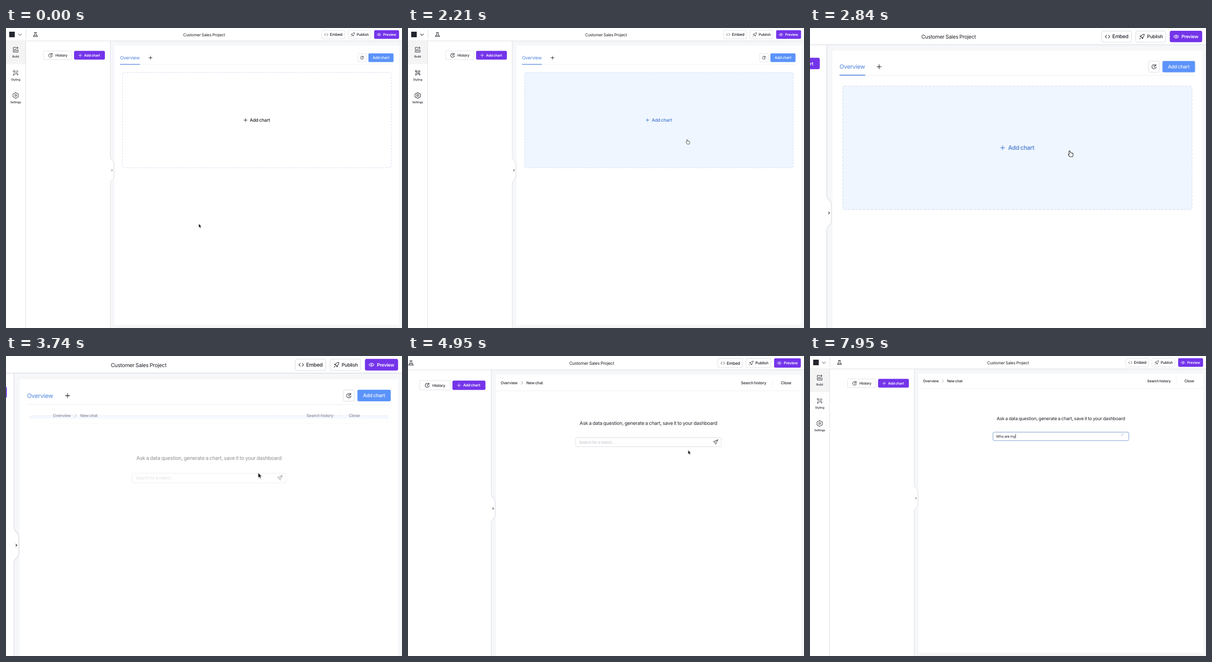
An HTML page that plays this animation: 861 by 650 pixels, repeating every 8 s.

```html
<!DOCTYPE html>
<html lang="en">
<head>
<meta charset="utf-8">
<title>Dashboard builder</title>
<style>
html, body { margin: 0; width: 100%; height: 100%; overflow: hidden; background: #fff; }
svg { display: block; width: 861px; height: 650px; }
text { font-family: Inter, "Open Sans", sans-serif; letter-spacing: -.02em; word-spacing: -.06em; fill: #20222a; white-space: pre; text-rendering: geometricPrecision; }
.mid { text-anchor: middle; }
.med { font-weight: 500; }
.semi { font-weight: 600; }
.white { fill: #fff; }
.icon { fill: none; stroke: #25272e; stroke-width: 1; stroke-linecap: round; stroke-linejoin: round; }
.thin { stroke-width: .8; }
.rule { fill: none; stroke: #d9dce2; }
.soft { fill: none; stroke: #f1f2f4; }
.btn { fill: #fff; stroke: #dfe1e6; }
.purple { fill: #7434ea; }

.cam, .tabs, .panel, .box, .hover, .tint, .underline, .pointer, .arrow, .hand, .beam, .focus, .caret {
  animation: 8s linear infinite;
}
.cam { transform-origin: 861px 0; animation-name: zoom; animation-timing-function: ease-in-out; }
.tabs { animation-name: leave; }
.panel { transform-origin: 545.5px 339px; animation-name: open; animation-timing-function: ease-in-out; }
.box { animation-name: collapse; }
.hover { animation-name: hover; }
.tint { fill: #20222a; stroke: #20222a; animation-name: tint; }
.tint text { fill: inherit; stroke: none; }
.underline { animation-name: underline; animation-timing-function: step-end; }
.pointer { animation-name: travel; }
.arrow { animation-name: arrow; animation-timing-function: step-end; }
.hand { animation-name: hand; animation-timing-function: step-end; }
.beam { animation-name: beam; animation-timing-function: step-end; }
.focus { animation-name: focus; }
.caret { animation-name: blink; }
.spinner { transform-origin: 681.5px 173.5px; animation: spin 1s linear -.05s infinite; }

@keyframes zoom {
  0%, 27.625% { transform: scale(1); }
  37.625%, 55.125% { transform: scale(1.33); }
  65.125%, 100% { transform: scale(1); }
}
@keyframes leave { 0%, 47% { opacity: 1; } 49.5%, 100% { opacity: 0; } }
@keyframes open {
  0%, 43.375% { opacity: 0; transform: scale(.69); }
  50%, 100% { opacity: 1; transform: scale(1); }
}
@keyframes collapse {
  0%, 43.375% { clip-path: inset(0 0 0 0); opacity: 1; }
  46.75% { clip-path: inset(0 0 97% 0); opacity: .65; }
  47.5%, 100% { clip-path: inset(0 0 100% 0); opacity: .5; }
}
@keyframes hover { 0%, 19.4% { opacity: 0; } 21.2%, 100% { opacity: 1; } }
@keyframes tint {
  0%, 19.4% { fill: #20222a; stroke: #20222a; }
  21.2%, 100% { fill: #4478cf; stroke: #4478cf; }
}
@keyframes underline { 0% { opacity: 1; } 43.4%, 100% { opacity: 0; } }
@keyframes travel {
  0% { transform: translate(419px, 424px); }
  10.5%, 12.5% { transform: translate(455px, 385px); }
  22.4% { transform: translate(578px, 268px); }
  27.6% { transform: translate(606px, 242px); }
  32.9% { transform: translate(636.5px, 214.5px); }
  39.5% { transform: translate(625.8px, 190px); }
  63% { transform: translate(625.8px, 190px); animation-timing-function: ease-in-out; }
  70.4%, 100% { transform: translate(523.7px, 178px); }
}
@keyframes arrow { 0% { opacity: 1; } 19.4% { opacity: 0; } 43.4% { opacity: 1; } 67%, 100% { opacity: 0; } }
@keyframes hand { 0% { opacity: 0; } 19.4% { opacity: 1; } 43.4%, 100% { opacity: 0; } }
@keyframes beam { 0% { opacity: 0; } 67% { opacity: 1; } 87.2%, 100% { opacity: 0; } }
@keyframes focus { 0%, 73.7% { opacity: 0; } 74.4%, 100% { opacity: 1; } }
@keyframes blink {
  0%, 74% { opacity: 0; }
  74.2%, 80.2% { opacity: 1; }
  81.5%, 86.8% { opacity: 0; }
  87.1%, 100% { opacity: 1; }
}
@keyframes spin { to { transform: rotate(360deg); } }
</style>
</head>
<body>
<svg viewBox="0 0 861 650">
  <defs>
    <path id="plus" d="M-3.5 0H3.5M0-3.5V3.5"/>
    <path id="clock" d="M3.2-2.7A4.2 4.2 0 1 0 4.2.5M3.7-4.3V-2H1.4M0-2V.4L1.7 1.4"/>
  </defs>
  <g class="cam">
    <rect width="861" height="650" fill="#fff"/>
    <rect x="227" y="28" width="634" height="622" fill="#f6f7f9"/>
    <rect x="236" y="38" width="619" height="605" rx="2" fill="#fff"/>

    <!-- top bar -->
    <path class="rule" d="M0 28H861M43.5 4V24"/>
    <rect x="7" y="8" width="12" height="12" fill="#25272e"/>
    <path class="icon" d="M26.8 12.8L30.2 16.2L33.6 12.8" stroke-width="1.2"/>
    <path class="icon" d="M61.7 9.5H66.3M62.6 9.5V13L59.3 18.6H68.7L65.4 13V9.5M61 16H67" stroke-width="1.2"/>
    <text class="mid" x="430.5" y="17.7" font-size="8.7">Customer Sales Project</text>
    <rect class="btn" x="686.5" y="5" width="50" height="18.6" rx="3"/>
    <path class="icon thin" d="M694.8 12L692.5 14.4L694.8 16.8M697.8 12L700.1 14.4L697.8 16.8"/>
    <text class="med" x="704.3" y="17.3" font-size="8.4">Embed</text>
    <rect class="btn" x="743.5" y="5" width="50" height="18.6" rx="3"/>
    <path class="icon thin" d="M757.7 10.4C754.8 10.4 753 12.2 751.8 14.4L754 16.5C756.2 15.4 757.8 13.4 757.7 10.4ZM752.8 12.9L750.4 13.4L751.8 14.4M755.5 15.7L755 18L754 16.5M750 18.3L751.8 16.5"/>
    <text class="med" x="762.4" y="17.2" font-size="7.85">Publish</text>
    <rect class="purple" x="800.4" y="4.7" width="54.2" height="18.9" rx="3"/>
    <g class="icon thin" style="stroke:#fff">
      <path d="M807 14.3C809.2 10.8 813.2 10.8 815.2 14.3C813.2 17.8 809.2 17.8 807 14.3Z"/>
      <circle cx="811.1" cy="14.3" r="1.2"/>
    </g>
    <text class="semi white" x="820" y="17.1" font-size="7.6">Preview</text>

    <!-- navigation -->
    <rect y="28.5" width="42.5" height="49.5" fill="#f4f4f5"/>
    <path class="rule" d="M42.8 28V650"/>
    <path class="icon" d="M21.5 42H16V52.2H26.2V47M18.6 49.7V46.5M21 49.7V45M23.5 49.7V47.5M24.6 41V45M22.6 43H26.6" stroke-width="1.3"/>
    <text class="mid med" x="21" y="63.9" font-size="6.25">Build</text>
    <path class="icon" d="M16 102L17 99.2L24 92.2L26 94.2L19 101.2ZM17.2 95.5L19.5 93.2L16.8 91.8L15.8 93ZM22.5 99.2L25.6 102.2L26.2 99.8L24 97.7" stroke-width="1.1"/>
    <text class="mid med" x="21" y="113.7" font-size="6.25">Styling</text>
    <path class="icon" d="M19.7 140H22.3L22.9 141.7L24.8 142.6L26.3 142.2L27.3 144.4L26.1 146L27.3 147.8L26.1 150L24.5 149.7L22.9 150.6L22.3 152.3H19.7L19.1 150.6L17.5 149.7L15.8 150L14.7 147.8L15.9 146L14.7 144.4L15.8 142.2L17.5 142.6L19.1 141.7Z"/>
    <circle class="icon" cx="21" cy="146.1" r="2"/>
    <text class="mid med" x="21" y="163.4" font-size="6.3">Settings</text>

    <!-- sidebar -->
    <rect class="btn" x="81.5" y="49.7" width="62" height="18.9" rx="3"/>
    <use class="icon" href="#clock" x="97" y="59.2"/>
    <text class="med" x="107.4" y="62.1" font-size="7.9">History</text>
    <rect class="purple" x="148" y="49.6" width="67" height="19" rx="3"/>
    <use class="icon thin" href="#plus" x="161.3" y="59.2" style="stroke:#fff"/>
    <text class="semi white" x="169.8" y="62" font-size="7.65">Add chart</text>
    <path class="rule" d="M226.7 28V280C227 286 234.5 287 234.5 295V321C234.5 329 227 330 226.7 336V650" style="fill:#fff"/>
    <path class="icon" d="M229.7 306.5L231.4 308.2L229.7 309.9"/>

    <!-- dashboard tab -->
    <g class="tabs">
      <path class="soft" d="M248 79H843"/>
      <text x="248" y="68.1" font-size="9.9" style="fill:#4a80dc">Overview</text>
      <path class="underline" d="M248 78.6H291" stroke="#4a80dc" stroke-width="1.3"/>
      <use class="icon" href="#plus" x="314.2" y="64.5"/>
      <rect class="btn" x="764.8" y="55.3" width="18.4" height="18.4" rx="3"/>
      <use class="icon" href="#clock" transform="translate(774 64.5) scale(.85)"/>
      <rect x="788" y="55" width="54.6" height="18.8" rx="2.5" fill="#5b93fa"/>
      <text class="med white" x="797.2" y="67.4" font-size="8.1">Add chart</text>
    </g>
    <g class="box">
      <rect class="hover" x="253.3" y="96.6" width="584.4" height="206" rx="3" fill="#eff6ff"/>
      <rect x="253.3" y="96.6" width="584.4" height="206" rx="3" fill="none" stroke="#d9dff0" stroke-width="1.2" stroke-dasharray="4 2.4"/>
      <g class="tint">
        <use href="#plus" x="520.8" y="199.6" stroke-linecap="round"/>
        <text class="med" x="530" y="203.1" font-size="9.85">Add chart</text>
      </g>
    </g>

    <!-- chat panel -->
    <g class="panel">
      <path class="soft" d="M236 70.5H855M797.3 47V61"/>
      <text class="med" x="245.8" y="57" font-size="7.8">Overview</text>
      <path class="icon" d="M287.6 51.3L290.6 54.3L287.6 57.3" style="stroke:#a5a9b2"/>
      <text class="med" x="298" y="57" font-size="7.8">New chat</text>
      <text class="med" x="733" y="57" font-size="7.8">Search history</text>
      <text class="med" x="814" y="57" font-size="8.05">Close</text>
      <text class="mid" x="545.5" y="139.2" font-size="9.88">Ask a data question, generate a chart, save it to your dashboard</text>
      <rect x="397.8" y="165" width="295.4" height="18.4" rx="3" fill="#fff" stroke="#dfe1e6"/>
      <rect class="focus" x="397.8" y="165" width="295.4" height="18.4" rx="3" fill="none" stroke="#7fa0cf"/>
      <g id="idle">
        <text x="404.7" y="176.9" font-size="7.93" style="fill:#bdc0c8">Search for a metric...</text>
        <path class="icon thin" d="M686.2 169.2L677 173L680.2 174.8L681.8 178.2ZM686.2 169.2L680.2 174.8"/>
      </g>
      <g id="busy">
        <text id="typed" x="404.5" y="176.8" font-size="7.85"></text>
        <path class="spinner" d="M677 173.5A4.5 4.5 0 0 1 681.5 169" fill="none" stroke="#7f9fd6"/>
      </g>
      <path id="caret" class="caret" d="M405 168.8V178.4" stroke="#20222a" stroke-width=".9"/>
    </g>

    <g class="pointer">
      <path class="arrow" d="M0 0V8.6L2 6.9L3.4 9.9L4.8 9.2L3.4 6.4H6Z" fill="#111" stroke="#fff" stroke-width=".6"/>
      <path class="hand" d="M-.5.7C.1-.3 1.4 0 1.6 1L2 3.2L5 3.7C6.2 4 6.6 4.6 6.5 5.6L6 8.2L5.2 9.8H1L-1.6 6.6C-2 5.6-.9 5 0 5.8Z" fill="#fff" stroke="#222" stroke-width=".9" stroke-linejoin="round"/>
      <path class="beam" d="M-2-4.8Q0-4.8 0-3.6Q0-4.8 2-4.8M0-3.6V3.8M-2 5Q0 5 0 3.8Q0 5 2 5M-1.1 1.6H1.1" fill="none" stroke="#222"/>
    </g>
  </g>
</svg>
<script>
const phrase = "Who are my";
const typeStart = 6960, typeStep = 105, loop = 8000;
const byId = id => document.getElementById(id);
const [idle, busy, typed, caret] = ["idle", "busy", "typed", "caret"].map(byId);
const clock = document.querySelector(".cam").getAnimations()[0];
let shown = -1;

function draw() {
  const t = (clock.currentTime || 0) % loop;
  const count = Math.min(phrase.length, Math.max(0, Math.floor((t - typeStart) / typeStep) + 1));
  if (count !== shown) {
    shown = count;
    typed.textContent = phrase.slice(0, count);
    idle.style.display = count ? "none" : "";
    busy.style.display = count ? "" : "none";
    const width = count ? typed.getComputedTextLength() : 0;
    caret.setAttribute("transform", `translate(${width} 0)`);
  }
  requestAnimationFrame(draw);
}
draw();
</script>
</body>
</html>
```
